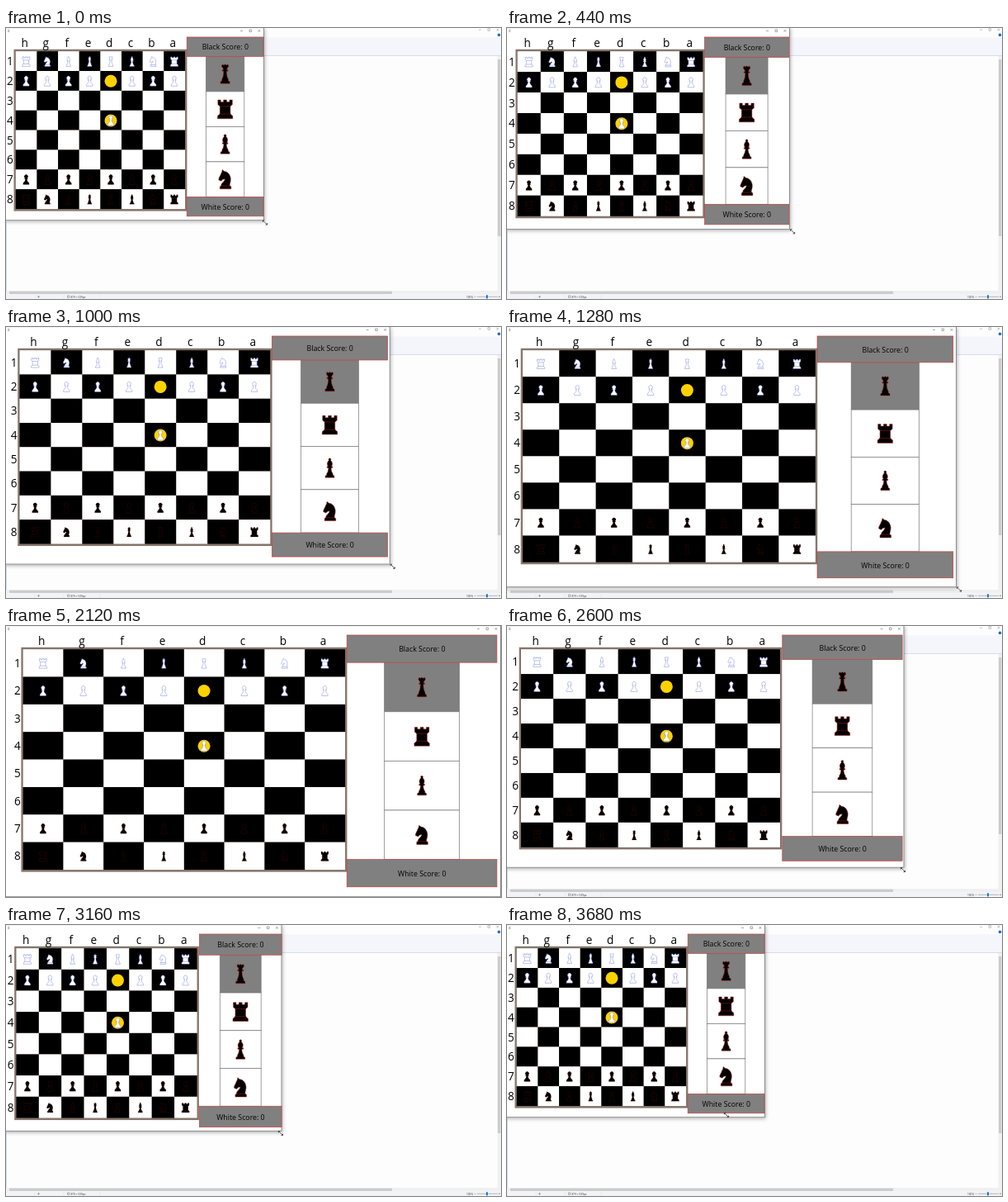
Recreate the animation shown at these times as an HTML page. Size 600x328 px, loop 4000 ms.

```html
<!DOCTYPE html>
<html lang="en">
<head>
<meta charset="utf-8">
<title>Resizing chess window</title>
<style>
html, body { margin: 0; width: 100%; height: 100%; overflow: hidden; background: #fff; }
svg { display: block; width: 100%; height: 100%; }
text { font-family: "Open Sans", "Noto Sans", sans-serif; text-anchor: middle; }
</style>
</head>
<body>
<svg id="stage" viewBox="0 0 600 328">
  <defs>
    <filter id="shadow" x="-5%" y="-5%" width="112%" height="112%">
      <feDropShadow dx="1" dy="1.5" stdDeviation="2" flood-opacity=".3"/>
    </filter>
  </defs>
</svg>
<script>
const LOOP = 4000, STEP = 40, MIN_W = 313, MIN_H = 233;
const stage = document.getElementById('stage');

function add(parent, tag, attrs = {}, text) {
  const el = document.createElementNS('http://www.w3.org/2000/svg', tag);
  set(el, attrs);
  if (text) el.textContent = text;
  parent.appendChild(el);
  return el;
}
function set(el, attrs) {
  for (const k in attrs) el.setAttribute(k, attrs[k]);
}
const box = (x, y, width, height) => ({ x, y, width, height });
const rect = (parent, x, y, w, h, fill) => add(parent, 'rect', { ...box(x, y, w, h), fill });
const line = (parent, d, stroke, width = .6) =>
  add(parent, 'path', { d, stroke, 'stroke-width': width, fill: 'none' });
const move = (el, x, y) => el.setAttribute('transform', `translate(${x} ${y})`);

// Outlines centred on the origin, 24 units tall
const SHAPES = {
  pawn: 'M-2.6-4A4.6 4.6 0 1 1 2.6-4H4V-2H2.2C2.4 2 3.5 4 5.5 6L7.5 8.5V12H-7.5V8.5L-5.5 6C-3.5 4-2.4 2-2.2-2H-4V-4Z',
  rook: 'M-9-11.5H-5.5V-9H-2V-11.5H2V-9H5.5V-11.5H9V-5.5L6.5-3.5V5L7 6.5L9.5 8.5V12H-9.5V8.5L-7 6.5L-6.5 5V-3.5L-9-5.5ZM-6.5-3.5H6.5M-7 6H7',
  knight: 'M-6.5 12V9L-5 8C-5 4.5-.5 3-.3-.3C-2-.2-3.5 .3-4.8 2.2L-8 .8C-8.3-2-6-4-5-7.5L-4-9.3L-3.6-12L-1-10C3-10 7-5.5 7 0C7 3.5 5.5 5.5 5.8 8L7.5 9V12ZM-5 8.2H5.8',
  bishop: 'M-1-9.6A1.5 1.5 0 1 1 1-9.6C3.2-7.5 4-4.5 2-2H3.4V-.3H1.7C1.8 3 2.3 5 3.8 7V8.5L5.6 9.8V12H-5.6V9.8L-3.8 8.5V7C-2.3 5-1.8 3-1.7-.3H-3.4V-2H-2C-4-4.5-3.2-7.5-1-9.6Z',
  queen: 'M-4.4-9.5L-3.6-12L-1.4-11L0-12.3L1.4-11L3.6-12L4.4-9.5L2.6-7L2.2-5H3.6V-3.6H1.9C1.9 2 2.6 4 4 6.5V8.5L5.8 9.5V12H-5.8V9.5L-4 8.5V6.5C-2.6 4-1.9 2-1.9-3.6H-3.6V-5H-2.2L-2.6-7Z',
  king: 'M-1-12.3H1V-10H3.2L2.2-5H3.4V-3.6H1.8C1.8 2 2.4 4 3.8 6.5V8.5L5.4 9.5V12H-5.4V9.5L-3.8 8.5V6.5C-2.4 4-1.8 2-1.8-3.6H-3.4V-5H-2.2L-3.2-10H-1Z'
};
const BACK_ROW = ['rook', 'knight', 'bishop', 'king', 'queen', 'bishop', 'knight', 'rook'];
const BOARD_SCALE = .49, PANEL_SCALE = .97;

function piece(parent, kind, white, scale) {
  const g = add(parent, 'g');
  add(g, 'path', {
    d: SHAPES[kind], transform: `scale(${scale})`,
    fill: white ? '#fff' : '#000', stroke: white ? '#5a66d8' : '#b81c1c',
    'stroke-width': white ? .95 : .55,
    'stroke-opacity': white ? .85 : scale === BOARD_SCALE ? .5 : .9
  });
  return g;
}

function drawButtons(parent, stroke) {
  line(parent, 'M-29 3.5H-26M-18 2h2.6v2.6h-2.6zM-7.5 2l2.8 2.8M-4.7 2l-2.8 2.8', stroke, .5);
}

function drawDesktop() {
  rect(stage, 0, 0, 600, 328, '#fdfdfe');
  const buttons = add(stage, 'g');
  move(buttons, 602, -1.3);
  drawButtons(buttons, '#888');
  rect(stage, 0, 11.5, 600, 22, '#f5f6fb');
  line(stage, 'M0 33.5H600', '#ccd6e8', .8);
  add(stage, 'circle', { cx: 597.5, cy: 8.4, r: 1.8, fill: '#1f6fc5' });
  line(stage, 'M.4 34V318', '#b9c9e6', .7);
  rect(stage, 595.5, 34, 4.5, 284, '#f1f1f1');
  rect(stage, 596, 38, 3.5, 214, '#cdcdcd');
  rect(stage, 0, 318, 600, 4.5, '#f0f0f0');
  rect(stage, 4, 318.7, 464, 3.2, '#cbcbcb');
  rect(stage, 0, 322.5, 600, 5.5, '#f2f3f7');
  line(stage, 'M38 325.3h3M39.5 323.8v3M74.5 324h2.4v2.4h-2.4z', '#666', .5);
  line(stage, 'M35 323v5M70 323v5M114 323v5', '#d8dbe2', .4);
  add(stage, 'text', { x: 87.5, y: 326.5, 'font-size': 3.2, fill: '#333' }, '879 × 539px');
  add(stage, 'text', { x: 562, y: 326.5, 'font-size': 3.2, fill: '#333' }, '100%');
  line(stage, 'M567.5 325.3h2M571 325.3H596M597 325.3h2M598 324.3v2', '#777', .5);
  rect(stage, 582, 323.3, 2, 4, '#1979ca');
}

drawDesktop();

const win = add(stage, 'g');
const frame = add(win, 'rect', { fill: '#fff', stroke: '#777', 'stroke-width': .8, filter: 'url(#shadow)' });
line(win, 'M2 2.2h2.4M2 3.4h2.4M2 4.6h2.4', '#777', .5);
const controls = add(win, 'g');
drawButtons(controls, '#555');

const rim = add(win, 'rect', { fill: '#85756c' });
const squares = [], pieces = [], files = [], ranks = [];
for (let r = 0; r < 8; r++)
  for (let c = 0; c < 8; c++)
    squares.push({ r, c, el: add(win, 'rect', { fill: (r + c) % 2 ? '#000' : '#fff' }) });

const marks = [1, 3].map(r => ({ r, c: 4, el: add(win, 'circle', { r: 7.5, fill: '#ffd200' }) }));

function place(kind, r, c) {
  pieces.push({ r, c, el: piece(win, kind, r < 4, BOARD_SCALE) });
}
for (let c = 0; c < 8; c++) {
  place(BACK_ROW[c], 0, c);
  place('pawn', c === 4 ? 3 : 1, c);
  place('pawn', 6, c);
  place(BACK_ROW[c], 7, c);
  files.push(add(win, 'text', { y: 23, 'font-size': 13.6 }, 'hgfedcba'[c]));
  ranks.push(add(win, 'text', { 'font-size': 13.6 }, String(c + 1)));
}

const slots = ['queen', 'rook', 'bishop', 'knight'].map((kind, i) => ({
  cell: add(win, 'rect', { fill: i ? '#fff' : '#808080', stroke: '#777', 'stroke-width': .7 }),
  icon: piece(win, kind, false, PANEL_SCALE)
}));
const bars = ['Black Score: 0', 'White Score: 0'].map(label => ({
  el: add(win, 'rect', { fill: '#808080', stroke: '#c93c3c', 'stroke-width': .7 }),
  label: add(win, 'text', { 'font-size': 8.8 }, label)
}));

const cursor = add(stage, 'g');
line(cursor, 'M-2.2-2.2L2.2 2.2', '#fff', 1.8);
line(cursor, 'M-2.2-2.2L2.2 2.2M-2.6-.6V-2.6H-.6M2.6 .6V2.6H.6', '#222', .8);

// Pointer path: time, x, y
const DRAG = [
  [0, 314, 235.5], [240, 314, 235.5], [720, 391, 261.5], [800, 412, 270],
  [1280, 548, 317.5], [1360, 582, 325], [1480, 603, 331], [1680, 606, 334],
  [2080, 606, 334], [2120, 603, 331], [2600, 480, 295], [2920, 390.3, 271],
  [3440, 266, 230], [LOOP, 266, 230]
];

function pointer(t) {
  const i = DRAG.findIndex(k => k[0] > t);
  const [t0, x0, y0] = DRAG[i - 1], [t1, x1, y1] = DRAG[i];
  const p = (t - t0) / (t1 - t0);
  return [x0 + (x1 - x0) * p, y0 + (y1 - y0) * p];
}
const clamp = (v, lo, hi) => Math.min(hi, Math.max(lo, v));

function layoutBoard(w, h) {
  const dw = w - MIN_W, dh = h - MIN_H;
  const left = 11.8 + dw * .031, right = 217 + dw * .676;
  const top = 28.2, bottom = 219 + dh * .8;
  const cw = (right - left) / 8, ch = (bottom - top) / 8;
  const midX = c => left + (c + .5) * cw, midY = r => top + (r + .5) * ch;

  set(rim, box(left - 2.3, top - 2.4, right - left + 4.7, bottom - top + 5));
  for (const { r, c, el } of squares) set(el, box(left + c * cw, top + r * ch, cw + .05, ch + .05));
  for (const { r, c, el } of marks) set(el, { cx: midX(c) - .2, cy: midY(r) + .3 });
  for (const { r, c, el } of pieces) move(el, midX(c) - .2, midY(r) + .4);
  files.forEach((el, c) => el.setAttribute('x', midX(c) - 2));
  ranks.forEach((el, r) => set(el, { x: left - 6.8, y: midY(r) + 5 }));
}

function layoutPanel(w, h) {
  const dw = w - MIN_W, dh = h - MIN_H;
  const left = 219.2 + dw * .676, width = 312 + dw * .986 - left;
  const barH = 23.4 + dh * .103, end = 227.8 + dh * .926;
  const cx = left + width / 2, slotY = 11 + barH, slotH = (end - barH - slotY) / 4;
  bars.forEach(({ el, label }, i) => {
    const y = i ? end - barH : 11;
    set(el, box(left, y, width, barH));
    set(label, { x: cx + .2, y: y + barH / 2 + 3.7 });
  });
  slots.forEach(({ cell, icon }, i) => {
    set(cell, box(cx - width / 4, slotY + i * slotH, width / 2, slotH));
    move(icon, cx, slotY + (i + .5) * slotH);
  });
}

function render(t) {
  const [x, y] = pointer(t);
  const shrinking = t > 2000;
  const w = clamp(x + (shrinking ? 1.5 : -3), MIN_W, 600);
  const h = clamp(y - 2.5, MIN_H, 328);
  set(frame, box(-1, -.3, w + .5, h));
  move(controls, w, 0);
  // Contents trail slightly behind the edge while shrinking
  const lagW = shrinking && w > MIN_W ? 1 : 0;
  const lagH = shrinking && h > MIN_H ? 1.5 : 0;
  const innerH = Math.min(h + lagH, 328);
  layoutBoard(w, innerH);
  layoutPanel(Math.min(w + lagW, 600), innerH);
  move(cursor, x, y);
}

const start = performance.now();
function tick(now) {
  const t = Math.max(0, now - start) % LOOP;
  render(Math.floor(t / STEP) * STEP);
  requestAnimationFrame(tick);
}
render(0);
requestAnimationFrame(tick);
</script>
</body>
</html>
```
